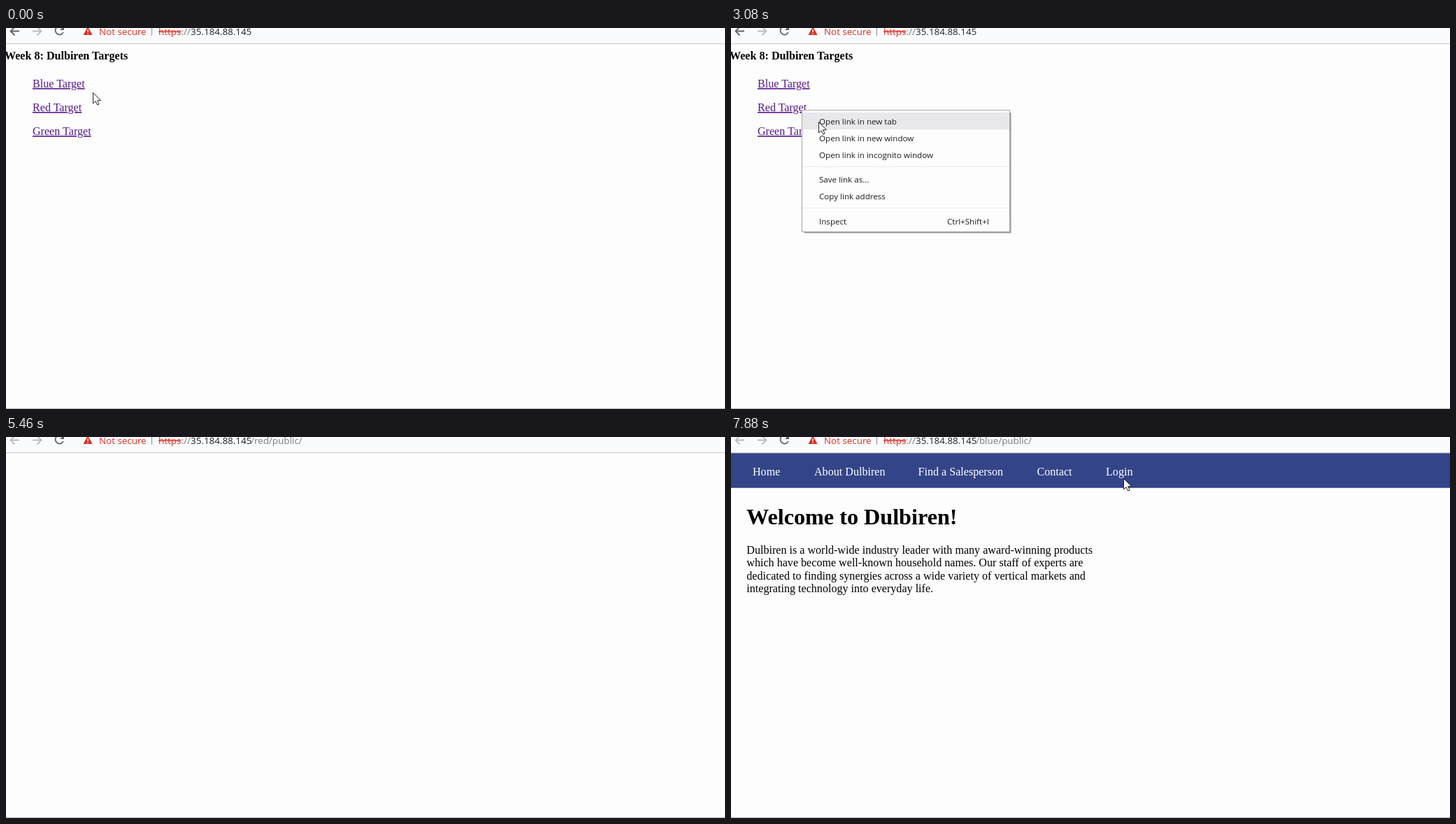
Recreate the animation shown at these times as an HTML page. Size 1028 by 545 pixels, loop 8000 ms.

```html
<!DOCTYPE html>
<html lang="en">
<head>
<meta charset="utf-8">
<title>Week 8 targets</title>
<style>
html, body { margin: 0; width: 100%; height: 100%; overflow: hidden; background: #fdfdfd; }
svg { display: block; width: 1028px; height: 545px; }
text { white-space: pre; }

.serif { font: 16.1px "Liberation Serif", serif; }
.bold { font-weight: bold; }
.title { font-size: 32.2px; }
.links { fill: #551a8b; text-decoration: underline; }
.bar { font: 13.4px "Open Sans", sans-serif; fill: #777a7e; }
.bar .alert { fill: #d93025; }
.bar .host { fill: #202124; }
.strike { text-decoration: line-through; }
.icon { fill: none; stroke: #5f6368; stroke-width: 1.8; }
.faded { stroke: #babcbe; }
.menu { font: 11.6px "Open Sans", sans-serif; fill: #1c1c1c; }
.nav-text { fill: #fff; }

/* Every change is a hard cut on one shared 8 s clock. */
#back, #list, #blueLink, #bluePath, #redPath, #site, #nav, #menu, #row, #arrow, #hand {
  animation: 8s step-end infinite;
}
#back { animation-name: back; }
#list { animation-name: list; }
#blueLink { animation-name: press; }
#bluePath { animation-name: bluePath; }
#redPath { animation-name: redPath; }
#site { animation-name: site; }
#nav { animation-name: nav; }
#menu { animation-name: menu; }
#row { animation-name: row; }
#arrow { animation-name: arrow; }
#hand { animation-name: hand; }

@keyframes back { 0% { stroke: #5f6368; } 52.75%, 100% { stroke: #babcbe; } }
@keyframes list { 0% { opacity: 1; } 52.75%, 100% { opacity: 0; } }
@keyframes press { 0%, 12.5%, 100% { fill: #551a8b; } 10.625% { fill: #e00; } }
@keyframes bluePath { 0%, 68.25% { opacity: 0; } 52.75%, 93.25%, 100% { opacity: 1; } }
@keyframes redPath { 0%, 93.25%, 100% { opacity: 0; } 68.25% { opacity: 1; } }
@keyframes site { 0%, 68.25% { opacity: 0; } 54.625%, 69.75%, 100% { opacity: 1; } }
@keyframes nav { 0%, 93.25%, 100% { fill: #348; } 68.25% { fill: #b32; } }
@keyframes menu {
  0%, 19.75% { opacity: 0; transform: translate(95px, 79px); }
  12.5% { opacity: 1; transform: translate(95px, 79px); }
  33.375% { opacity: 1; transform: translate(101px, 117px); }
  42.25%, 100% { opacity: 0; transform: translate(101px, 117px); }
}
@keyframes row { 0%, 19.75% { opacity: 0; } 16.25%, 38.5%, 100% { opacity: 1; } }
@keyframes arrow {
  0% { opacity: 1; transform: translate(124px, 92px); }
  1.875% { opacity: 1; transform: translate(112px, 89px); }
  3.375% { opacity: 0; transform: none; }
  12.5% { opacity: 1; transform: translate(94px, 80px); }
  16.25% { opacity: 1; transform: translate(109px, 88px); }
  17.875% { opacity: 1; transform: translate(115px, 92px); }
  23.25% { opacity: 1; transform: translate(111px, 106px); }
  24.75% { opacity: 0; transform: none; }
  33.375% { opacity: 1; transform: translate(100px, 118px); }
  38.5% { opacity: 1; transform: translate(125px, 134px); }
  40.375% { opacity: 1; transform: translate(126px, 134px); }
  44.125% { opacity: 1; transform: translate(127px, 131px); }
  45.75% { opacity: 1; transform: translate(128px, 129px); }
  52.75% { opacity: 0; transform: none; }
  95.125% { opacity: 1; transform: translate(511px, 32px); }
  97% { opacity: 1; transform: translate(541px, 49px); }
  98.5%, 100% { opacity: 1; transform: translate(561px, 59px); }
}
@keyframes hand {
  0% { opacity: 0; transform: none; }
  3.375% { opacity: 1; transform: translate(94px, 84px); }
  5.25% { opacity: 1; transform: translate(88px, 86px); }
  7.125% { opacity: 1; transform: translate(89px, 80px); }
  12.5% { opacity: 0; transform: none; }
  24.75% { opacity: 1; transform: translate(102px, 122px); }
  26.625% { opacity: 1; transform: translate(95px, 120px); }
  28.375% { opacity: 1; transform: translate(95px, 119px); }
  33.375%, 100% { opacity: 0; transform: none; }
}
</style>
</head>
<body>
<svg viewBox="0 0 1028 545">
  <rect width="1028" height="545" fill="#fdfdfd"/>

  <g class="bar">
    <rect width="1028" height="22" fill="#fafbfc"/>
    <path d="M0 22.5H1028" stroke="#c8c8c8"/>
    <path id="back" class="icon" d="M19 4.5H7M12.5-1.5 6.5 4.5 12.5 10.5"/>
    <path class="icon faded" d="M38 4.5H50M44.5-1.5 50.5 4.5 44.5 10.5"/>
    <path class="icon" d="M81-.5A6 6 0 1 0 82 6"/>
    <path d="M83-3V3H77Z" fill="#5f6368"/>
    <path d="M117-2 123.5 10H110.5Z" fill="#d93025"/>
    <path d="M117 2V6M117 7.2V8.7" stroke="#fff" stroke-width="1.4"/>
    <text class="alert" x="133" y="10">Not secure</text>
    <path d="M208.5 0V11" stroke="#8a8d91"/>
    <text class="alert strike" x="218" y="10">https</text>
    <text x="250.5" y="10">://</text>
    <text class="host" x="264" y="10">35.184.88.145</text>
    <text id="bluePath" x="350" y="10">/blue/public/</text>
    <text id="redPath" x="350" y="10">/red/public/</text>
  </g>

  <g id="list" class="serif">
    <text class="bold" x="-2" y="45">Week 8: Dulbiren Targets</text>
    <g class="links">
      <text id="blueLink" x="38" y="85">Blue Target</text>
      <text x="38" y="119">Red Target</text>
      <text x="38" y="153">Green Target</text>
    </g>
  </g>

  <g id="site" class="serif">
    <rect id="nav" y="23.2" width="1028" height="49.6"/>
    <g class="nav-text">
      <text x="31" y="54.5">Home</text>
      <text x="119" y="54.5">About Dulbiren</text>
      <text x="267.5" y="54.5">Find a Salesperson</text>
      <text x="437.5" y="54.5">Contact</text>
      <text x="536" y="54.5">Login</text>
    </g>
    <text class="bold title" x="22" y="125">Welcome to Dulbiren!</text>
    <text x="22.3" y="167.3">Dulbiren is a world-wide industry leader with many award-winning products</text>
    <text x="22.3" y="185.4">which have become well-known household names. Our staff of experts are</text>
    <text x="22.3" y="203.5">dedicated to finding synergies across a wide variety of vertical markets and</text>
    <text x="22.3" y="221.6">integrating technology into everyday life.</text>
  </g>

  <path d="M0 544.5H1028" stroke="#b4b4b4"/>

  <g id="menu" class="menu">
    <path d="M4 175.5H298.5V4" fill="none" stroke="#9c9c9c" stroke-width="2"/>
    <rect x=".5" y=".5" width="297" height="174" fill="#fdfdfd" stroke="#a8a8a8"/>
    <rect id="row" x="1" y="4" width="296" height="24" fill="#e8e8ec"/>
    <path d="M1 81.5H297M1 140.5H297" stroke="#e9e9e9"/>
    <text x="25" y="21">Open link in new tab</text>
    <text x="25" y="45">Open link in new window</text>
    <text x="25" y="69">Open link in incognito window</text>
    <text x="25" y="104">Save link as...</text>
    <text x="25" y="128">Copy link address</text>
    <text x="25" y="164">Inspect</text>
    <text x="268" y="164" text-anchor="end">Ctrl+Shift+I</text>
  </g>

  <g fill="#fff" stroke="#222" stroke-linejoin="round">
    <path id="arrow" d="M.5.5V16L4 12.7 6.5 18 9 17 6.6 11.7H11.5Z"/>
    <g id="hand">
      <path d="M5 11V2Q5 .5 6.3 .5T7.6 2V7Q10 5.5 10.3 7.5 12.5 6.5 12.8 8.5 15 8 15 10V14Q14.5 16 13.5 19.5H6.5Q5.5 17 3 14L1 11.5Q.5 9.5 2.5 9.7Z"/>
      <path d="M7.6 7V10.5M10.3 7.5V10.5M12.8 8.5V11" fill="none"/>
    </g>
  </g>
</svg>
</body>
</html>
```
